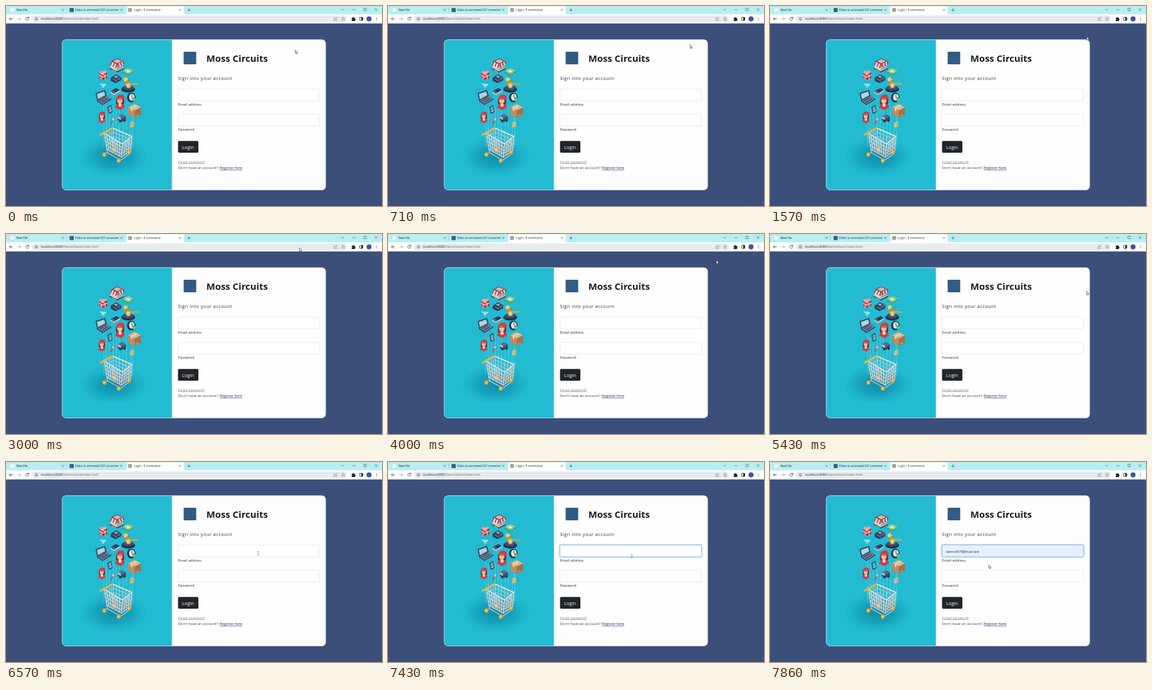
These frames come from a looping animation (600 by 319 pixels, 8000 ms). An HTML page:

```html
<!DOCTYPE html>
<html lang="en">
<head>
<meta charset="utf-8">
<title>Login</title>
<style>
  html, body { margin: 0; width: 100%; height: 100%; overflow: hidden; background: #3c4f7b; }
  svg { display: block; width: 100%; height: 100%; }
  text { font-family: "Open Sans", "Noto Sans", sans-serif; fill: #2b2f34; }
  .line { fill: none; stroke-linecap: round; stroke-linejoin: round; }
</style>
</head>
<body>
<svg id="stage" viewBox="0 0 600 319" preserveAspectRatio="none">
  <defs>
    <radialGradient id="shade">
      <stop offset="0" stop-color="#087f9d" stop-opacity=".8"/>
      <stop offset=".55" stop-color="#0c91ad" stop-opacity=".55"/>
      <stop offset="1" stop-color="#15a9c2" stop-opacity=".08"/>
    </radialGradient>
    <clipPath id="card"><rect x="89.6" y="53.6" width="420.6" height="240" rx="6"/></clipPath>
  </defs>
  <rect width="600" height="319" fill="#3c4f7b"/>
  <g id="browser"></g>
  <g clip-path="url(#card)">
    <rect x="89" y="53" width="422" height="241" fill="#fefefe"/>
    <rect x="89" y="53" width="175.7" height="241" fill="#22bbd1"/>
    <g id="art"></g>
  </g>
  <rect x="89.8" y="53.8" width="420.2" height="239.6" rx="6" fill="none" stroke="#d5e6ef" stroke-width=".6"/>
  <g id="form"></g>
  <g id="arrow">
    <path d="M0 0V5.6L1.3 4.5 2.2 6.5 3.2 6 2.3 4.1H4Z" fill="#fff" stroke="#222" stroke-width=".55" stroke-linejoin="round"/>
  </g>
  <path id="beam" class="line" d="M-1-2.6H1M0-2.6V2.6M-1 2.6H1" stroke="#666" stroke-width=".55"/>
</svg>
<script>
const $ = id => document.getElementById(id);

const path = (d, stroke, width = .7) =>
  `<path class="line" d="${d}" stroke="${stroke}" stroke-width="${width}"/>`;
const shape = (d, fill) => `<path d="${d}" fill="${fill}"/>`;
const rect = (x, y, w, h, fill, rx = 0, extra = '') =>
  `<rect x="${x}" y="${y}" width="${w}" height="${h}" rx="${rx}" fill="${fill}" ${extra}/>`;
const oval = (x, y, rx, ry, fill, extra = '') =>
  `<ellipse cx="${x}" cy="${y}" rx="${rx}" ry="${ry}" fill="${fill}" ${extra}/>`;
const label = (x, y, size, text, style = '') =>
  `<text x="${x}" y="${y}" font-size="${size}" style="${style}">${text}</text>`;

// Isometric box standing on its front corner (x, y).
function box(x, y, w, d, h, top, left, right) {
  return shape(`M${x} ${y}l${-w} ${-w / 2}v${-h}l${w} ${w / 2}z`, left)
    + shape(`M${x} ${y}l${d} ${-d / 2}v${-h}l${-d} ${d / 2}z`, right)
    + shape(`M${x} ${y - h}l${-w} ${-w / 2}l${d} ${-d / 2}l${w} ${w / 2}z`, top);
}

function drawBrowser() {
  const ink = '#3a4145', soft = '#687178';
  const cross = (x, y, r) => path(`M${x - r} ${y - r}l${2 * r} ${2 * r}m0 ${-2 * r}l${-2 * r} ${2 * r}`, ink, .55);
  return rect(0, 0, 600, 14, '#b8eef2')
    + shape('M190 13.5Q192 13.5 192 11.5V2.5Q192 .4 194 .4H281.5Q283.6 .4 283.6 2.5V11.5Q283.6 13.5 285.6 13.5Z', '#fff')
    + rect(0, 13.3, 600, 14.5, '#fff')
    + oval(10, 6.3, 2.9, 2.9, '#fff') + rect(101.5, 3.2, 6.5, 6.5, '#3d5a8a') + rect(195, 3.3, 6, 6, '#a3a58f')
    + label(16.6, 8.2, 4.6, 'New File') + label(110, 8.2, 4.65, 'Video to animated GIF converter')
    + label(204, 8.2, 4.65, 'Login - E-commerce')
    + [90.5, 184, 277.5].map(x => cross(x, 6.3, 1.4)).join('')
    + path('M96.5 3.5v6', '#84aeb4', .5)
    + path('M289.8 6.5h4.4m-2.2-2.2v4.4', ink, .6)
    + path('M535 5l2 2 2-2M553 6h4', ink, .6)
    + rect(571, 3.5, 4, 4, 'none', .5, `stroke="${ink}" stroke-width=".6"`) + cross(590.5, 5.7, 2)
    + path('M10.5 20.5H5.5m2.2-2.2l-2.2 2.2 2.2 2.2', ink, .75)
    + path('M18.5 20.5H23.5m-2.2-2.2l2.2 2.2-2.2 2.2', '#a0a5a8', .75)
    + path('M36 18.7a2.5 2.5 0 1 0 .5 2.5M36.4 17.5v1.9h-2', ink, .75)
    + rect(41, 14.9, 503, 11.2, '#e8ebed', 5.6)
    + oval(48.5, 20.5, 2.2, 2.2, 'none', `stroke="${ink}" stroke-width=".6"`)
    + path('M48.5 20.3v1.2m0-2.4v.1', ink, .6)
    + label(56, 22.4, 5.13, 'localhost:8080<tspan fill="#667078">/XenonStack/index.html</tspan>')
    + path('M525 19.5h-1.8v3.5h4.5v-1.5M524.8 21.3q.5-2.5 3-2.5m-1.2-1.2l1.3 1.2-1.3 1.2', soft, .55)
    + path('M538 17.8l.8 1.9 2 .1-1.6 1.3.6 2-1.8-1.1-1.8 1.1.6-2-1.6-1.3 2-.1z', soft, .55)
    + shape('M551.5 18.8h1.7a1 1 0 0 1 2 0h1.7v1.7a1 1 0 0 1 0 2v1.6h-5.4v-1.7a1 1 0 0 0 0-2z', '#222629')
    + rect(564.3, 18, 5, 5, 'none', .5, 'stroke="#222629" stroke-width=".8"') + rect(566.8, 18, 2.5, 5, '#222629')
    + oval(579.3, 20.5, 4, 4, '#3d53a5')
    + [18.5, 20.5, 22.5].map(y => oval(591.5, y, .6, .6, ink)).join('');
}

function drawPerson(x, y, s, hair) {
  return `<g transform="translate(${x} ${y}) scale(${s})">`
    + shape('M-5-1Q-6 5-4 7L4 7Q6 3 5-1Z', hair)
    + shape('M-6 10Q-6 4.500 0 4.500T6 9L1 13Z', '#d63a3f') + shape('M-1.500 4.500h3l.5 3-2 1.200-2-1.200z', '#f0e6df')
    + oval(-.3, .3, 3.5, 4.6, '#eeb79c') + shape('M-5 0Q-5-7 1-7T5.5 0L3-2-3-2.5Z', '#d93a3f')
    + path('M-4.500-1.500L3.500-1', '#a32b34', .9) + '</g>';
}

function drawCart() {
  const left = [157, 203], back = [171, 195], right = [201, 208], front = [186, 220];
  const low = { left: [161, 229], back: [172, 221], right: [199, 231], front: [184, 241] };
  const mix = (a, b, k) => a.map((v, i) => +(v + (b[i] - v) * k).toFixed(1));
  const panel = (a, b, c, d, cols, color, rows = 4) => {
    let lines = '';
    for (let i = 0; i <= cols; i++) lines += `M${mix(a, b, i / cols)}L${mix(c, d, i / cols)}`;
    for (let i = 0; i <= rows; i++) lines += `M${mix(a, c, i / rows)}L${mix(b, d, i / rows)}`;
    return path(lines, color, 1);
  };
  const wheel = (x, y) => oval(x, y, 3, 3.6, '#e9a227') + oval(x - .5, y, 1.4, 2, '#f9d06a');
  return wheel(173, 229)
    + panel(left, back, low.left, low.back, 4, '#a5c9d3')
    + panel(back, right, low.back, low.right, 6, '#b3cdd5')
    + panel(low.left, low.back, low.front, low.right, 4, '#c9a9a6')
    + panel(left, front, low.left, low.front, 7, '#ecdcda')
    + panel(front, right, low.front, low.right, 4, '#e3cecb')
    + path(`M${left}L${back}L${right}L${front}Z`, '#f2e8e6', 1.4)
    + path('M157 203L162 234L183 246L198 235M162 234L157 236M157 203l-4 2', '#dcc6c4', 1.2)
    + path('M150.5 205.5L170 195', '#e9a82c', 2.8) + path('M150.5 204.7L170 194.200', '#fad066', .9)
    + wheel(157, 237) + wheel(180, 246.5) + wheel(196.500, 233);
}

function drawArt() {
  const strings = [[156, 148], [160, 165], [165, 168], [171, 160], [176, 155], [181, 165], [187, 180], [192, 160], [198, 190], [202, 175]];
  return oval(172, 240, 53, 31, 'url(#shade)')
    + strings.map(([x, y]) => path(`M${x} ${y}V${222 + (x % 5) * 2}`, '#8fdce7', .45)
      + oval(x, y + 30, .6, .6, '#c9f2f6')).join('')
    // shop
    + box(177, 106, 12, 11, 2, '#cfd0d2', '#414962', '#333a54')
    + box(177, 103, 10, 9, 9, '#5d4f58', '#d8c9c6', '#a8a5ae')
    + shape('M168.5 88l9-4.500 9.500 4.500-9.500 5z', '#7d4950') + shape('M171 88l6.500-3.200 7 3.200-7 3.500z', '#d8b6af')
    + [0, 1, 2, 3, 4].map(i => shape(`M${168 + i * 2} ${88.5 + i}l2 1-2.200 5.500-2-1z`, i % 2 ? '#f4eae7' : '#c9454b')).join('')
    + [0, 1, 2, 3, 4].map(i => shape(`M${178 + i * 2} ${92.5 - i}l2-1 1.200 5-2 1z`, i % 2 ? '#e6dedd' : '#b93d45')).join('')
    + path('M170 102l5 2.500', '#e0b473', 1)
    // gift
    + box(155, 118, 6.2, 6.5, 9, '#e8908d', '#cf3d47', '#ab2f3c')
    + path('M148.8 110.500l6.200 3.100 6.500-3.300M152 107.800l6.500 3.200M151.900 112v4.600M158.200 112v4.600', '#f3e3e1', 1.1)
    + path('M155 107q-5-5-5-1.500t5 1.500q5-6 5-2.500t-5 2.500', '#e9c6c4', 1)
    // cash
    + shape('M186 104l9-5 9 4-9 6z', '#93cb86') + shape('M186 104v2l9 5v-2zM195 109v2l9-6v-2z', '#4b9a66')
    + oval(195, 104, 2.9, 1.7, '#dcecc4') + path('M190.5 101.5l8.5 4.500', '#e8f3ca', 1)
    // register
    + box(175, 123, 8, 9, 5, '#4a5570', '#2b3450', '#374060')
    + shape('M169 114l6-5 6 3-6 5z', '#2b334f') + shape('M172 113l3-2.500 4 2-3 2.500z', '#8fb4c6')
    + path('M171 117l6 3M179 117l3-1.500', '#b8c5d2', .7)
    // plane
    + shape('M150 124l10 1-5 6-1.500-4z', '#8fd3df') + path('M150 124l10 1-6.500 2zM153.500 127l1 3.500', '#cdeff3', .7)
    // cards
    + shape('M166 136l10-5 6 3-10 6z', '#2f3f62') + shape('M166 136v2l6 4v-2zM172 140v2l10-6v-2z', '#c4d2dc')
    + path('M168 135l6 4', '#d2686b', 1.1)
    // gavel
    + oval(195, 133, 11, 5, '#202b49') + oval(195, 131, 9.5, 4.2, '#3a4462') + oval(195, 130, 6, 2.400, '#56607a')
    + path('M195 124L210.500 124.500', '#e3a531', 2.2)
    + path('M191.500 117.500l3.500 9', '#cf922a', 6.500) + path('M191 117l.3.800M195 126.500l.3.800', '#f4cb68', 6.500)
    + path('M190 121l6-2.500', '#8e5f24', .9)
    // laptop
    + shape('M145 150l15-8 8 5.500-14 9z', '#6d7c92') + shape('M145 150v1.500l9 6.500v-1.500zM154 156.500v1.500l14-9v-1.500z', '#28334f')
    + shape('M143 139l15-5 2.500 9-15 8z', '#263350') + shape('M144.800 140l12-4 2 6.500-12.300 6.500z', '#9cc7d6')
    + path('M147 142l7-2.500M147.500 145l9-4', '#dcedf2', 1) + path('M150 151l9-5M153 153.500l9-5.500', '#33405c', 1.200)
    + drawPerson(182, 150, 1.25, '#6b2f35')
    // clock with tick
    + oval(200, 146, 6.8, 7.800, '#233250') + oval(200.800, 145.500, 4.500, 5.500, '#dbe6e6')
    + path('M201 142v4l3 1', '#27334f', .8) + oval(204.500, 149.500, 2.800, 3, '#52ad62')
    + path('M203.300 149.500l1 1 1.800-2', '#fff', .7)
    // phone
    + shape('M162 161l6-3 2 11-6 3z', '#2b3a58') + shape('M163.500 162l4-2 1.500 8-4 2z', '#8dbccb')
    + path('M164.500 164l3-1.500m-2.500 4l3-1.500', '#3c6484', .8)
    // parcel
    + box(205.500, 178.500, 10.500, 10, 12, '#dfb587', '#c08b5e', '#a57149')
    + shape('M199 162.500l9-4.500 2.500 1.300-9 4.700v4l-2.500-1.200z', '#ecd2ae') + path('M207.500 175.500l4-2', '#e2c29b', .9)
    + drawPerson(153, 175, .95, '#4d3a3d')
    // magnifier
    + path('M167 188l3-5', '#c4454b', 1.500)
    + oval(171, 180.500, 2.100, 2.700, '#a5dbe4', 'stroke="#d4575b" stroke-width=".8"')
    // truck
    + box(185, 185, 6.500, 6.500, 6, '#5b6983', '#2f3f5d', '#3b4b69')
    + shape('M178.500 175.500l5 2.500v4l-5-2.500z', '#a3c7d4') + oval(182, 184, 1.400, 1.700, '#18233d') + oval(189.500, 183, 1.400, 1.700, '#18233d')
    // price tag
    + shape('M198 187.500l4-4 2.500 2.500v5.500l-5 2.500-1.500-2z', '#e2c27a') + path('M199.500 189l3.500-2m-2.500 4l3-1.700', '#bb8644', .7)
    + drawCart();
}

function drawForm() {
  const field = (y, extra = '') => rect(274.5, y, 225.7, 18.5, '#fff', 1.8, `stroke="#dfe3e7" stroke-width=".7" ${extra}`);
  return rect(283.5, 73, 20, 20, '#315b83')
    + label(319.7, 89, 14.9, 'Moss Circuits', 'font-weight:700;fill:#1b1f23')
    + label(274.5, 118.3, 7.2, 'Sign into your account', 'letter-spacing:.54px')
    + rect(274.5, 132.5, 225.7, 18.5, 'none', 2, 'id="glow" stroke="#0d6efd" stroke-width="3.6" stroke-opacity=".27"')
    + field(132.5, 'id="email"') + field(173)
    + label(281, 144.8, 5.35, 'demo5678@mail.test', 'font-family:"Liberation Sans",sans-serif;fill:#111')
      .replace('<text', '<text id="value"')
    + label(274.5, 158.5, 5.8, 'Email address') + label(274.5, 199.4, 5.8, 'Password')
    + rect(274.5, 215.2, 32.5, 18.8, '#212529', 1.8)
    + label(281, 228, 7.5, 'Login', 'fill:#fff')
    + label(274.5, 250.5, 5.2, 'Forgot password?', 'fill:#777d83;text-decoration:underline')
    + label(274.5, 260.2, 5.95, "Don't have an account?", 'fill:#393f68')
    + label(341, 260.2, 5.85, 'Register here', 'fill:#1d2b5e;text-decoration:underline');
}

$('browser').innerHTML = drawBrowser();
$('art').innerHTML = drawArt();
$('form').innerHTML = drawForm();

// Pointer stops: [tick, x, y], seven ticks per second.
const stops = [
  [0, 461.5, 70], [6, 486, 60], [7, 486, 60], [11, 505.5, 49], [14, 500, 38], [15, 500, 38],
  [21, 468.5, 22], [23, 484, 58], [28, 524, 42], [29, 524, 42], [37, 512, 86], [38, 505, 91],
  [45, 402.5, 145.5], [51, 402.5, 145.5], [55, 349, 164]
];
const LOOP = 8000, LAST = 55, FOCUS = 48, FILL = 54;

function pointerAt(tick) {
  const i = Math.max(1, stops.findIndex(s => s[0] >= tick));
  const [t0, x0, y0] = stops[i - 1], [t1, x1, y1] = stops[i];
  const k = (tick - t0) / (t1 - t0);
  return [x0 + (x1 - x0) * k, y0 + (y1 - y0) * k];
}

function render(now) {
  const tick = Math.min(LAST, Math.floor((now % LOOP + 5) * 7 / 1000));
  const [x, y] = pointerAt(tick);
  const overField = x > 274 && x < 500 && y > 132 && y < 151;
  const focus = Math.min(1, Math.max(0, (tick - FOCUS + 1) / 2));
  const filled = tick >= FILL;
  for (const id of ['arrow', 'beam']) $(id).setAttribute('transform', `translate(${x} ${y})`);
  $('arrow').style.display = overField ? 'none' : '';
  $('beam').style.display = overField ? '' : 'none';
  $('glow').style.opacity = focus;
  $('email').style.stroke = focus ? '#86b7fe' : '';
  $('email').style.fill = filled ? '#e8f0fe' : '';
  $('value').style.display = filled ? '' : 'none';
}

const start = performance.now();
function loop() {
  render(performance.now() - start);
  requestAnimationFrame(loop);
}
loop();
</script>
</body>
</html>
```
